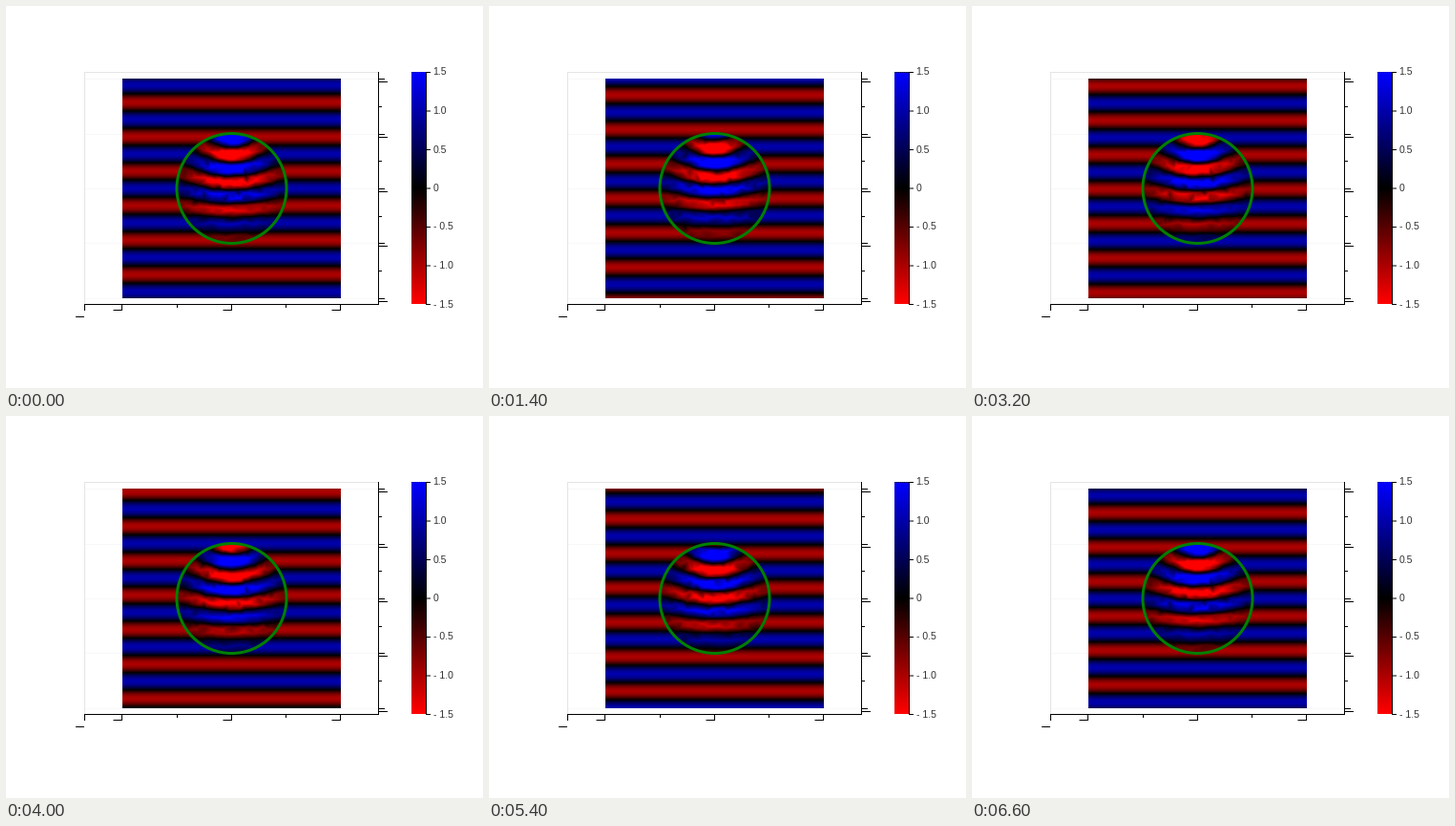
A matplotlib script that plays this animation: 500x400 px, repeating every 6.67 s.

```python
import numpy as np
import matplotlib.pyplot as plt
from matplotlib.animation import FuncAnimation
from matplotlib.colors import LinearSegmentedColormap
from matplotlib.patches import Circle
from matplotlib.tri import LinearTriInterpolator, Triangulation

W, H, DPI = 500, 400, 100
FRAMES, INTERVAL = 100, 66.7
LEFT, RIGHT, TOP, BOTTOM = 122, 351, 76, 306
CX, CY, R = 236.5, 191, 57.4
K = 10          # wavenumber outside the lens
LENS = 0.65     # index profile n^2 = 1 + LENS * (1 - r^2)
VMAX = 1.5


def propagate(steps=500, n=1024, half=4.0):
    """March a plane wave upward through the graded lens."""
    x = np.linspace(-half, half, n, endpoint=False)
    kx = 2 * np.pi * np.fft.fftfreq(n, 2 * half / n)
    dy = 2 / steps
    drift = np.exp(1j * dy * np.sqrt(K**2 - kx**2 + 0j))
    u = np.full(n, np.exp(-1j * K))
    rows = [u]
    for i in range(steps):
        y = -1 + (i + 0.5) * dy
        index = np.sqrt(1 + LENS * np.clip(1 - x**2 - y**2, 0, None))
        u = np.fft.ifft(np.fft.fft(u) * drift) * np.exp(1j * K * (index - 1) * dy)
        rows.append(u)
    return np.array(rows), dy, 2 * half / n, half


def lens_mesh(h=0.125):
    """Jittered hexagonal points plus a ring on the rim."""
    rng = np.random.default_rng(4)
    j, i = np.mgrid[-12:13, -16:17]
    px = (h * (i + 0.5 * (j % 2))).ravel()
    py = (h * 0.866 * j).ravel()
    px = px + rng.uniform(-0.3, 0.3, px.size) * h
    py = py + rng.uniform(-0.3, 0.3, py.size) * h
    keep = np.hypot(px, py) < 1 - 0.5 * h
    a = np.linspace(0, 2 * np.pi, 50, endpoint=False)
    return np.r_[px[keep], np.cos(a)], np.r_[py[keep], np.sin(a)]


def build_field():
    """Complex amplitude at every pixel of the plot."""
    gx, gy = np.meshgrid((np.arange(LEFT, RIGHT) + 0.5 - CX) / R,
                         (CY - np.arange(TOP, BOTTOM) - 0.5) / R)
    field = np.exp(1j * K * gy)
    rows, dy, dx, half = propagate()
    px, py = lens_mesh()
    row = np.clip(np.rint((py + 1) / dy).astype(int), 0, len(rows) - 1)
    u = rows[row, np.rint((px + half) / dx).astype(int)]
    u = u * (1 + 0.25 * py) * (0.9 + 0.75 * (1 - px**2 - py**2))
    mesh = Triangulation(px, py)
    re = LinearTriInterpolator(mesh, u.real)(gx, gy)
    im = LinearTriInterpolator(mesh, u.imag)(gx, gy)
    inside = ~np.ma.getmaskarray(re)
    field[inside] = re.data[inside] + 1j * im.data[inside]
    return field


fig = plt.figure(figsize=(W / DPI, H / DPI), dpi=DPI, facecolor="white")
ax = fig.add_axes([0, 0, 1, 1])
ax.axis("off")


def line(x0, y0, x1, y1, color="black", width=1, **kw):
    ax.plot([x0, x1], [y0, y1], color=color, lw=width * 72 / DPI,
            solid_capstyle="butt", snap=False, **kw)


def draw_axes():
    for y in np.linspace(TOP, BOTTOM, 5).round() + 0.5:
        line(82, y, 390, y, "#f8f8f8")
    line(82, 69.5, 390, 69.5, "#e4e4e4")
    line(82.5, 69, 82.5, 313, "#e4e4e4")
    line(390.5, 69, 390.5, 313)
    line(82, 312.5, 391, 312.5)

    line(82.5, 312, 82.5, 319)
    line(73, 325.5, 82, 325.5)
    for x in (121.5, 236.5, 350.5):
        line(x, 312, x, 319)
        line(x - 9, 318.5, x, 318.5)
    for x in (179.5, 293.5):
        line(x, 312, x, 316)

    for y in np.linspace(TOP, BOTTOM, 5).round() + 0.5:
        line(390, y, 397, y)
        line(390, y + 3, 400, y + 3)
    for y in np.linspace(105, 277, 4).round() + 0.5:
        line(390, y, 394, y)


def draw_colorbar(cmap):
    ramp = np.linspace(VMAX, -VMAX, 243)[:, None]
    ax.imshow(ramp, cmap=cmap, vmin=-VMAX, vmax=VMAX, aspect="auto",
              interpolation="nearest", extent=(425, 440, 312, 69))
    line(425, 69.5, 440, 69.5, "#000040", linestyle=(0, (1, 1)))
    line(440.5, 69, 440.5, 313)
    for i in range(7):
        v, y = VMAX - 0.5 * i, 69.5 + 40.5 * i
        line(440, y, 445, y)
        label = "0" if v == 0 else ("- " if v < 0 else "") + f"{abs(v):.1f}"
        ax.text(447.5, y + 3.0, label, family="Liberation Sans",
                size=10.5 * 72 / DPI, color="#333333", va="baseline")


cmap = LinearSegmentedColormap.from_list("wave", ["red", "black", "blue"], N=511)
field = build_field()

draw_axes()
draw_colorbar(cmap)
image = ax.imshow(field.real, cmap=cmap, vmin=-VMAX, vmax=VMAX, aspect="auto",
                  interpolation="nearest", extent=(LEFT, RIGHT, BOTTOM, TOP),
                  zorder=3)
ax.add_patch(Circle((CX, CY), 57.5, fill=False, ec="green",
                    lw=3 * 72 / DPI, zorder=4))
ax.set_xlim(0, W)
ax.set_ylim(H, 0)


def update(frame):
    phase = 2 * np.pi * frame / (FRAMES - 1)
    image.set_data((field * np.exp(-1j * phase)).real)
    return (image,)


anim = FuncAnimation(fig, update, frames=FRAMES, interval=INTERVAL,
                     repeat=True, repeat_delay=0, blit=False)
plt.show()
```
